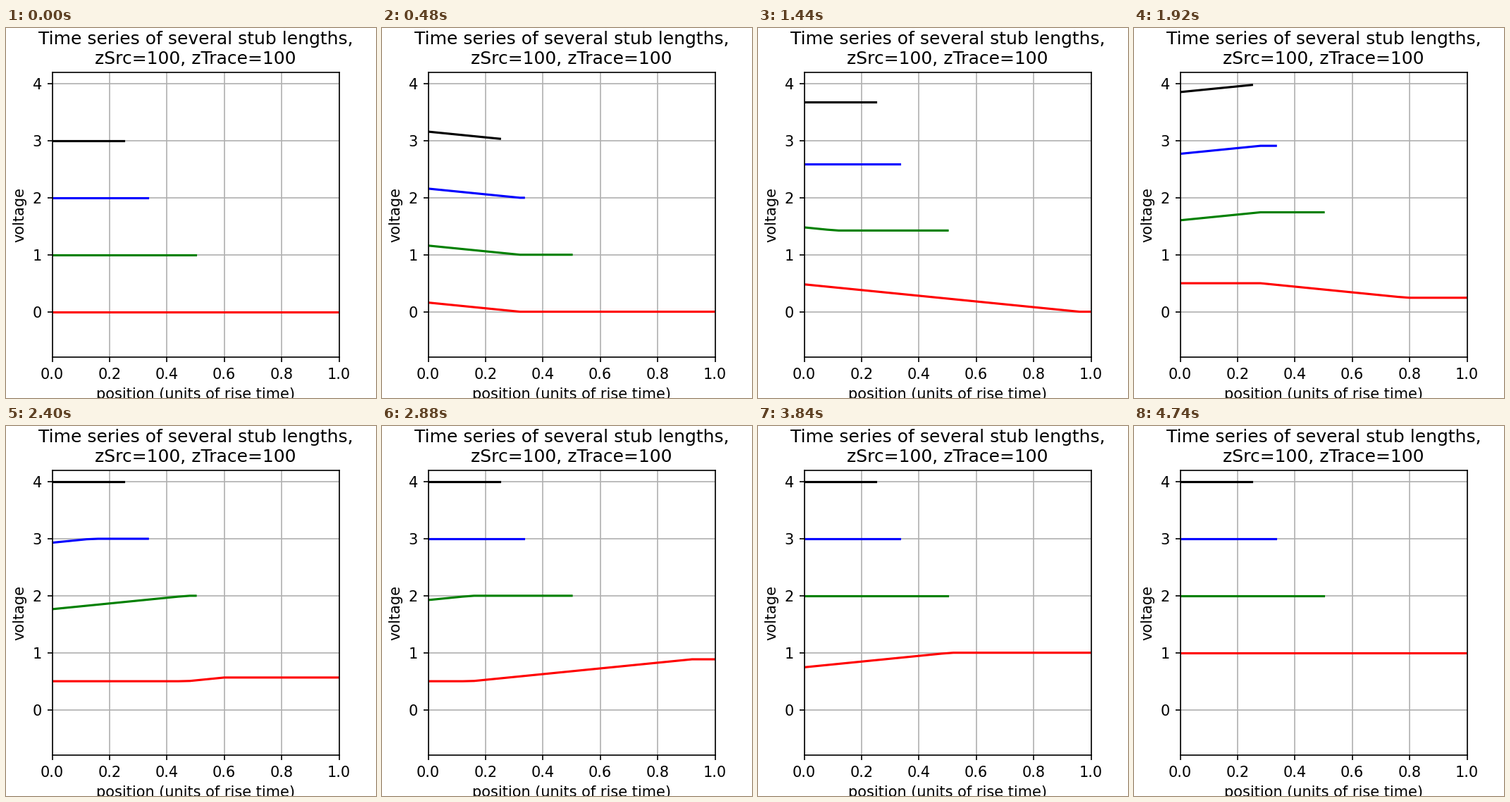
These frames come from a looping animation (525x525 px, 8000 ms). A matplotlib script:

```python
import numpy as np
import matplotlib.pyplot as plt
from matplotlib.animation import FuncAnimation

INTERVAL = 20          # ms per drawn frame
LOOP = 8000            # ms
STEP_MS = 60           # the wave advances once per step
LAST_STEP = 79
DT = 0.04              # time per step, in rise times
END_DELAY = 0.07       # extra round-trip delay at the open end

# (stub length, colour), each stub raised one volt above the previous
STUBS = [(1, "red"), (1 / 2, "green"), (1 / 3, "blue"), (1 / 4, "black")]


def ramp(t):
    return np.clip(t, 0, 1)


def voltage(x, t, length):
    """Incident ramp plus its reflection from the open end."""
    incident = ramp(t - x)
    reflected = ramp(t - (2 * length + END_DELAY - x))
    return 0.5 * (incident + reflected)


fig, ax = plt.subplots(figsize=(3.5, 3.5), dpi=150)
ax.set_title("Time series of several stub lengths,\nzSrc=100, zTrace=100")
ax.set_xlabel("position (units of rise time)")
ax.set_ylabel("voltage")
ax.set_xlim(0, 1)
ax.set_ylim(-0.8, 4.2)
ax.set_xticks(np.arange(6) / 5)
ax.set_yticks(range(5))
ax.grid(True)

waves = []
for offset, (length, color) in enumerate(STUBS):
    x = np.append(np.arange(0, length - 1e-9, DT), length)
    line, = ax.plot(x, np.full_like(x, offset), color=color)
    waves.append((line, x, length, offset))


def update(frame):
    step = min(frame * INTERVAL // STEP_MS, LAST_STEP)
    for line, x, length, offset in waves:
        line.set_ydata(offset + voltage(x, step * DT, length))
    return [wave[0] for wave in waves]


anim = FuncAnimation(fig, update, frames=LOOP // INTERVAL, interval=INTERVAL,
                     repeat=True, repeat_delay=0, blit=False)
plt.show()
```
